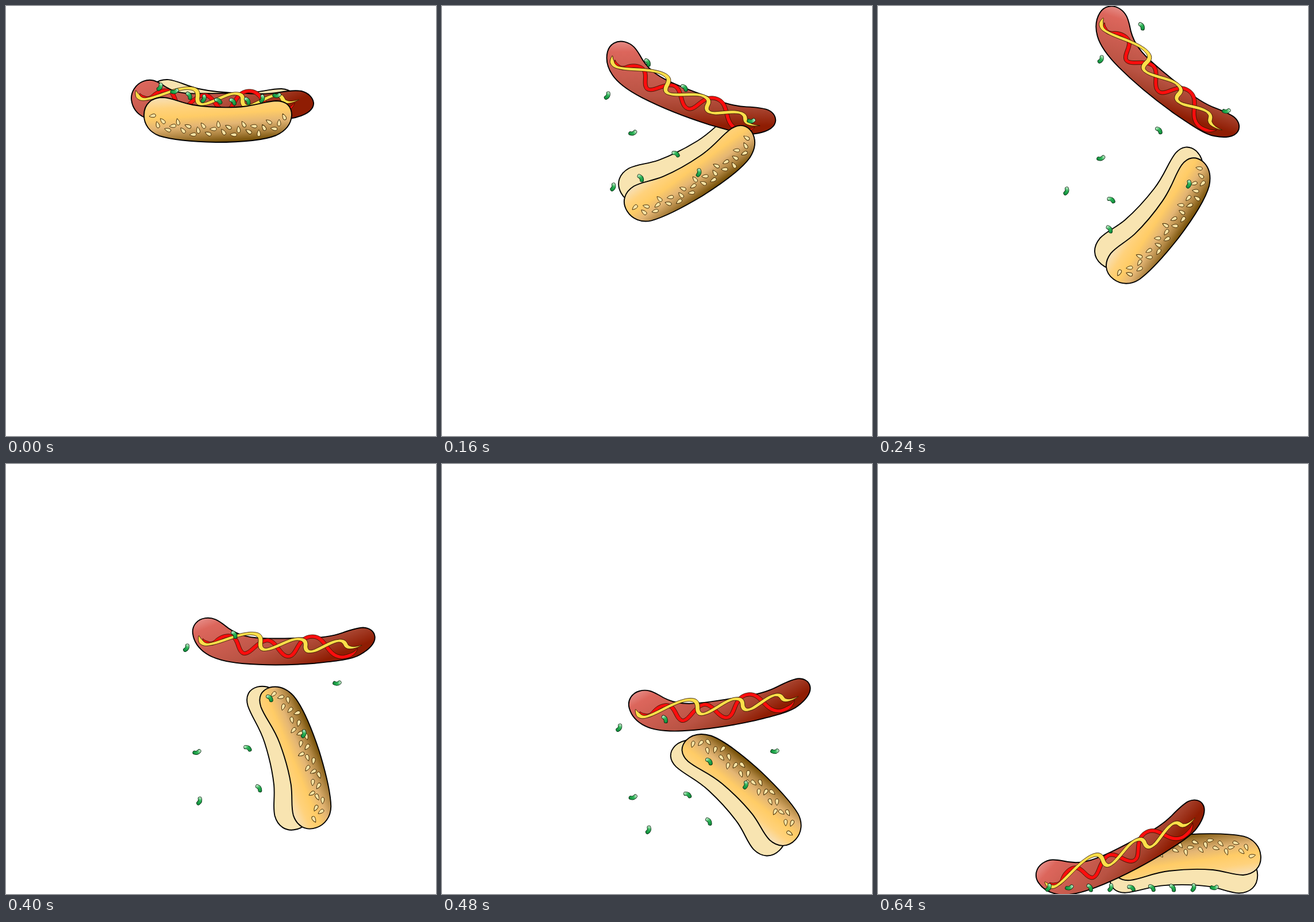
An HTML page that plays this animation: 748x748 px, repeating every 0.72 s.

```html
<!DOCTYPE html>
<html lang="en">
<head>
<meta charset="utf-8">
<title>Falling hot dog</title>
<style>
  html, body { margin: 0; width: 100%; height: 100%; overflow: hidden; background: #fff; }
  svg { display: block; width: 100vw; height: 100vh; }
  .edge { stroke: #000; stroke-width: 1.9; stroke-linejoin: round; }
  .sauce { stroke: #2a1400; stroke-width: .8; stroke-linejoin: round; }
  .seed { fill: #fae3a4; stroke: #3a2600; stroke-width: .9; stroke-linejoin: round; }
  .bean { fill: none; stroke-linecap: round; }
</style>
</head>
<body>
<svg viewBox="0 0 748 748" xmlns="http://www.w3.org/2000/svg">
  <defs>
    <linearGradient id="meat" gradientUnits="userSpaceOnUse" x1="352" y1="142" x2="394" y2="307">
      <stop offset="0" stop-color="#e58a84"/>
      <stop offset=".1" stop-color="#dc665c"/>
      <stop offset=".55" stop-color="#b95343"/>
      <stop offset=".7" stop-color="#a6412c"/>
      <stop offset=".86" stop-color="#8f1d03"/>
    </linearGradient>
    <linearGradient id="crust" gradientUnits="userSpaceOnUse" x1="273" y1="159" x2="279" y2="245">
      <stop offset="0" stop-color="#f7e0b8"/>
      <stop offset=".22" stop-color="#ffd27c"/>
      <stop offset=".42" stop-color="#ffcc66"/>
      <stop offset=".62" stop-color="#e3b574"/>
      <stop offset=".82" stop-color="#ad8340"/>
      <stop offset="1" stop-color="#6f4a00"/>
    </linearGradient>
    <linearGradient id="green" gradientUnits="userSpaceOnUse" x1="-7" y1="0" x2="7" y2="0">
      <stop offset="0" stop-color="#d2f2d6"/>
      <stop offset=".45" stop-color="#2db457"/>
      <stop offset="1" stop-color="#0d8a3a"/>
    </linearGradient>
    <path id="loaf" class="edge" d="M240 190C240 170 254 159 273 159C290 160 303 168 325 172C350 176 375 177 400 176C430 175 448 166 470 165C488 165 497 175 497 190C496 206 487 217 470 225C445 235 405 237 365 237C325 236 290 233 267 226C250 220 240 206 240 190Z"/>
    <g id="bean">
      <path class="bean" stroke="#06280f" stroke-width="7" d="M-4.2 .6Q0 -2.2 4.2 1"/>
      <path class="bean" stroke="url(#green)" stroke-width="5.4" d="M-4.2 .6Q0 -2.2 4.2 1"/>
    </g>
  </defs>
  <g id="back"><use href="#loaf" fill="#f8e4b1" transform="translate(8 -31) rotate(2.9 272 191)"/></g>
  <g id="dog">
    <path id="sausage" class="edge" fill="url(#meat)"/>
    <g id="sauces"></g>
  </g>
  <g id="front"><use href="#loaf" fill="url(#crust)"/></g>
  <g id="relish"></g>
</svg>
<script>
const NS = 'http://www.w3.org/2000/svg';
const STEP = 80, STEPS = 9;
const get = id => document.getElementById(id);
const fract = v => v - Math.floor(v);

function add(parent, tag, attrs) {
  const el = document.createElementNS(NS, tag);
  for (const k in attrs) el.setAttribute(k, attrs[k]);
  return parent.appendChild(el);
}

// A ribbon along a centre line, wider where it runs steeply, pointed at both ends.
function ribbon(d, fill, thin, extra, tip) {
  const line = document.createElementNS(NS, 'path');
  line.setAttribute('d', d);
  const len = line.getTotalLength(), left = [], right = [];
  for (let s = 0; s <= len; s += 2) {
    const p = line.getPointAtLength(s);
    const a = line.getPointAtLength(Math.max(0, s - 1));
    const b = line.getPointAtLength(Math.min(len, s + 1));
    const dx = b.x - a.x, dy = b.y - a.y, n = Math.hypot(dx, dy) || 1;
    const taper = Math.min(1, .15 + s / 12, .05 + (len - s) / tip);
    const w = (thin + extra * Math.abs(dy) / n) * taper / 2;
    left.push(`${p.x - dy / n * w} ${p.y + dx / n * w}`);
    right.unshift(`${p.x + dy / n * w} ${p.y - dx / n * w}`);
  }
  add(get('sauces'), 'path', { class: 'sauce', fill, d: 'M' + left.concat(right).join('L') + 'Z' });
}

ribbon('M343 177C347 188 358 190 366 184C377 176 393 175 399 185C404 195 402 207 410 212C422 215 434 196 452 195C470 195 471 228 488 228C502 227 506 199 529 199C558 200 550 238 580 242C594 242 602 238 608 230',
  '#ff0d0d', 6, .8, 20);
ribbon('M337 171C337 183 343 188 352 188C372 188 398 178 424 179C444 181 444 189 441 199C439 210 446 212 458 210C478 206 492 199 506 200C520 202 520 208 518 215C517 225 525 226 535 224C552 219 566 212 578 213C589 215 586 221 590 225C597 230 608 228 616 226',
  '#ffdf4a', 4.6, 3.2, 24);

const SAUSAGE = 'M327 166C327 152 338 142 352 142C366 142 374 149 383 158C400 177 418 185 445 190C470 195 495 197 520 200C548 204 570 203 585 200C600 197 612 195 622 196C634 198 640 206 640 214C640 226 626 236 610 242C594 249 560 247 530 246C480 243 440 237 405 229C375 222 356 213 345 203C334 193 327 180 327 166Z';

// Lowers both ends of the sausage by about the given amount.
const bent = amount => SAUSAGE.replace(/(\d+) (\d+)/g,
  (_, x, y) => `${x} ${+y + amount * ((x - 484) / 134) ** 2}`);

// Sesame: even spacing along the crust, scattered in height and turn.
for (let i = 0; i < 27; i++) {
  const x = 255 + 8.8 * i, u = (x - 370) / 115;
  const y = 205 + 22 * fract(i * .618) - 14 * u * u;
  const turn = -190 + 110 * fract(i * .757);
  add(get('front'), 'path', { class: 'seed', d: 'M6 0C2 -3.2 -5.5 -4.6 -5.5 0C-5.5 4.6 2 3.2 6 0Z',
    transform: `translate(${x} ${y}) rotate(${turn})` });
}

// step, x, y, turn
const bunKeys = [[0,370,192.5,0], [2,433.5,290,-32.3], [3,490,373,-53], [4,481.5,453,-79], [6,520.5,564,-137.8], [8,536,689,-184.4]];
const dogKeys = [[0,368,155,-8], [2,425,147.5,14.1], [3,495.5,118.5,32.1], [4,476.5,198.5,0], [6,478.5,415.5,-15.8], [8,421,671,-34.3]];

// Relish: turn and three points of each flight, which runs from the sausage to an even row on the floor
const flights = [
  [115, [288,156], [388,93], [320,181]],
  [160, [332,221], [388,265], [332,423]],
  [58, [358,98], [459,35], [407,150]],
  [105, [298,315], [328,322], [314,536]],
  [28, [407,257], [406,337], [414,413]],
  [45, [422,142], [489,216], [453,297]],
  [55, [346,299], [403,388], [416,506]],
  [100, [447,290], [541,310], [508,380]],
  [170, [538,200], [606,183], [573,263]]
];
const beans = flights.map(([turn, ...mid], i) => {
  const start = [268 + 25.4 * i, 141 + 25 * Math.sin(Math.PI * i / 10)];
  const end = [297 + 36 * i, 737];
  const steps = [0, 2, 3, 4, 8];
  return {
    el: add(get('relish'), 'use', { href: '#bean' }),
    keys: [start, ...mid, end].map(([x, y], k) => [steps[k], x, y, turn])
  };
});

function poseAt(keys, step) {
  const i = Math.max(1, keys.findIndex(k => k[0] >= step));
  const a = keys[i - 1], b = keys[i], f = (step - a[0]) / (b[0] - a[0]);
  return [1, 2, 3].map(c => a[c] + (b[c] - a[c]) * f);
}

function place(el, [x, y, turn], px = 0, py = 0) {
  el.setAttribute('transform', `translate(${x} ${y}) rotate(${turn}) translate(${-px} ${-py})`);
}

function draw(step) {
  const bun = poseAt(bunKeys, step);
  place(get('back'), bun, 370, 192.5);
  place(get('front'), bun, 370, 192.5);
  place(get('dog'), poseAt(dogKeys, step), 476.5, 198.5);
  // The sausage lies straighter while it is still in the bun.
  get('sausage').setAttribute('d', bent(step ? 0 : 15));
  for (const b of beans) place(b.el, poseAt(b.keys, step));
  // It lands on top of the bun.
  const above = step < 7 ? get('front') : get('relish');
  above.parentNode.insertBefore(get('dog'), above);
}

let shown = -1;
function tick() {
  const step = Math.floor(performance.now() / STEP) % STEPS;
  if (step !== shown) draw(shown = step);
  requestAnimationFrame(tick);
}
tick();
</script>
</body>
</html>
```
